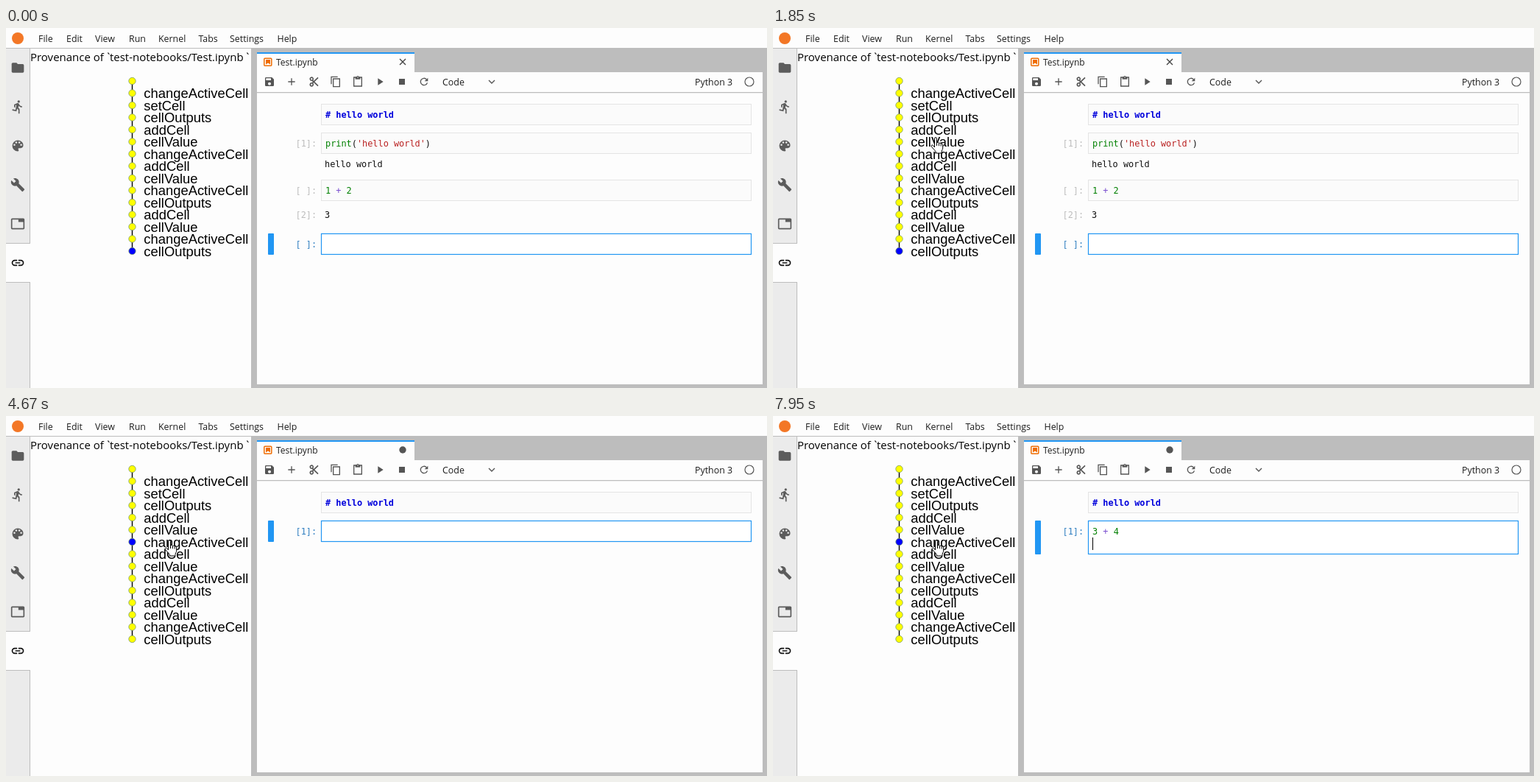
An HTML page that plays this animation: 1034 px wide and 489 px high, repeating every 8 s.

```html
<!DOCTYPE html>
<html lang="en">
<head>
<meta charset="utf-8">
<title>Notebook provenance</title>
<style>
  html, body { margin: 0; width: 100%; height: 100%; overflow: hidden; background: #fdfdfd; }
  svg { display: block; width: 1034px; height: 489px; }
  text { white-space: pre; }
  .ui { font: 12.4px "Open Sans", "Noto Sans", sans-serif; fill: #1c1c1c; }
  .title { font: 15px "Open Sans", "Noto Sans", sans-serif; fill: #000; }
  .tree { font: 18.4px "Liberation Sans", Arial, sans-serif; fill: #000; }
  .code { font: 11.88px "DejaVu Sans Mono", monospace; fill: #111; }
  .head { font-weight: bold; fill: #0000dc; }
  .num, .fn { fill: #008000; }
  .op { fill: #7b4fd0; }
  .str { fill: #ba2121; }
  .idle { fill: #bdbdbd; }
  .live { fill: #307fc1; }
</style>
</head>
<body>
<svg id="stage" viewBox="0 0 1034 489" xmlns="http://www.w3.org/2000/svg"></svg>
<script>
const LOOP = 8000, JUMP = 2690;
const PAPER = '#fdfdfd', GREY = '#bdbdbd', BLUE = '#2196f3', INK = '#555';

// ---- markup helpers ----
const rect = (x, y, w, h, fill, extra = '') =>
  `<rect x="${x}" y="${y}" width="${w}" height="${h}" fill="${fill}" ${extra}/>`;
const text = (x, y, cls, body) => `<text x="${x}" y="${y}" class="${cls}">${body}</text>`;
const span = (cls, body) => `<tspan class="${cls}">${body}</tspan>`;
const circle = (x, y, r, extra) => `<circle cx="${x}" cy="${y}" r="${r}" ${extra}/>`;
const path = (d, extra = '') => `<path d="${d}" ${extra}/>`;
const line = (d, width = 2) => path(d, `fill="none" stroke="currentColor" stroke-width="${width}"`);

// Icons live on a 24 unit grid and are centred on (x, y).
const icon = (body, x, y, size, color) => {
  const k = size / 24;
  return `<g transform="translate(${x - size / 2} ${y - size / 2}) scale(${k})" fill="${color}" color="${color}">${body}</g>`;
};

const ICONS = {
  folder: path('M10 4H4c-1.1 0-2 .9-2 2v12c0 1.1.9 2 2 2h16c1.1 0 2-.9 2-2V8c0-1.1-.9-2-2-2h-8z'),
  run: circle(13.5, 3.5, 2, '') +
    path('M9.9 19.4l1-4.4 2.1 2v6h2v-7.5l-2.1-2 .6-3c1.3 1.5 3.3 2.5 5.5 2.5v-2c-1.9 0-3.5-1-4.3-2.4l-1-1.6c-.4-.6-1-1-1.7-1l-.8.1L6 8.3V13h2V9.6l1.8-.7L8.2 17l-4.9-1-.4 2z'),
  palette: path('M12 3a9 9 0 0 0 0 18c.8 0 1.5-.7 1.5-1.5 0-.9-.8-1.200-.8-2 0-.8.7-1.500 1.500-1.500H16c2.800 0 5-2.200 5-5 0-4.400-4-8-9-8z') +
    [[6.5, 10.5], [9.5, 6.5], [14.5, 6.5], [17.5, 10.5]].map(([x, y]) => circle(x, y, 1.5, 'fill="#ebebeb"')).join(''),
  wrench: path('M22.7 19l-9.1-9.1c.9-2.3.4-5-1.5-6.900-2-2-5-2.400-7.400-1.300L9 6 6 9 1.600 4.700C.4 7.100.9 10.100 2.900 12.100c1.900 1.900 4.600 2.400 6.900 1.500l9.100 9.100c.4.400 1 .400 1.400 0l2.300-2.300c.5-.4.5-1.100.1-1.400z'),
  tabs: path('M21 3H3c-1.1 0-2 .9-2 2v14c0 1.100.9 2 2 2h18c1.100 0 2-.9 2-2V5c0-1.100-.9-2-2-2zm0 16H3V5h10v4h8z'),
  link: line('M11 8H7a4 4 0 0 0 0 8h4M13 8h4a4 4 0 0 1 0 8h-4M8 12h8'),
  save: path('M17 3H5a2 2 0 0 0-2 2v14a2 2 0 0 0 2 2h14a2 2 0 0 0 2-2V7zm-5 16a3 3 0 1 1 0-6 3 3 0 0 1 0 6zm3-10H5V5h10z'),
  add: line('M5 12h14M12 5v14'),
  cut: line('M9 15a3 3 0 1 1-1-0.200M9 9a3 3 0 1 0-1 0.200M8.500 8.500L21 20.500M8.500 15.500L21 3.500', 2.4),
  copy: line('M3 17V2h13M7 6h13v16H7z'),
  paste: line('M4 3h16v18H4z') + rect(7, 2, 10, 5, INK) + circle(12, 2.5, 2.5, '') + circle(12, 3, 1, `fill="${PAPER}"`),
  play: path('M8 5v14l11-7z'),
  stop: path('M6 6h12v12H6z'),
  reload: line('M18.700 14A7 7 0 1 1 17 7') + path('M20 4v7h-7z')
};

const join = (list, fn) => list.map(fn).join('');

// ---- cells ----
const prompt = (y, body, cls = 'idle') => text(393.5, y, 'code ' + cls, body);
const box = (y, body) =>
  rect(428.5, y + .5, 584, 28, '#fbfbfb', 'stroke="#e4e4e4"') + text(434, y + 19, 'code', body);
const activeBox = (y, h) =>
  rect(356, y, 8, h, BLUE, 'rx="1"') + rect(428.5, y + .5, 584, h - 1, '#fff', `stroke="${BLUE}" stroke-width="1.2"`);
const sum = (a, b) => span('num', a) + span('op', ' + ') + span('num', b);

// ---- provenance tree ----
const steps = ('start changeActiveCell setCell cellOutputs addCell cellValue changeActiveCell addCell ' +
  'cellValue changeActiveCell cellOutputs addCell cellValue changeActiveCell cellOutputs').split(' ');
const nodeY = i => 72 + 16.5 * i;

const chrome = () => [
  rect(0, 0, 1034, 489, PAPER),
  rect(0, 27, 1034, 1, GREY),
  circle(16, 14, 8, 'fill="#f37726"'),
  join([[44, 'File'], [82, 'Edit'], [121, 'View'], [167, 'Run'], [207, 'Kernel'],
    [261.5, 'Tabs'], [304, 'Settings'], [368.5, 'Help']], ([x, s]) => text(x, 19, 'ui', s)),

  rect(0, 28, 32, 461, '#ebebeb'),
  rect(32, 28, 1, 461, GREY),
  rect(0, 292, 33, 54, GREY),
  rect(0, 293, 33, 52, PAPER),
  join(['folder', 'run', 'palette', 'wrench', 'tabs'], (n, i) => icon(ICONS[n], 16, 54 + 53 * i, 20, '#5c5c5c')),
  icon(ICONS.link, 16, 319, 20, '#111'),

  `<text y="45" class="title"><tspan x="33">Provenance of</tspan><tspan x="135">\`</tspan>` +
    `<tspan x="141">test-notebooks/Test.ipynb</tspan><tspan x="324">\`</tspan></text>`,
  rect(170.8, 72, 1.4, 231, '#000'),
  join(steps, (s, i) => circle(171.5, nodeY(i), 4.7, `id="n${i}" stroke="#7a9a70" stroke-width=".8"`) +
    (i ? text(187.3, nodeY(i) + 6.5, 'tree', s) : '')),

  rect(333, 27, 701, 462, GREY),
  rect(341, 60, 687, 424, PAPER),
  rect(341, 33, 214, 27, PAPER),
  rect(341, 33, 214, 2, BLUE),
  rect(341, 87, 687, 1, GREY),
  rect(341, 88, 687, 1, '#ececec'),
  rect(350.8, 41.3, 10, 10, PAPER, 'stroke="#ef6c00" stroke-width="1.5" rx="1"'),
  path('M353 43h6v6.500l-3-2-3 2z', 'fill="#ef6c00"'),
  `<text x="367" y="51" class="ui" style="font-size:12px">Test.ipynb</text>`,
  join(['save', 'add', 'cut', 'copy', 'paste', 'play', 'stop', 'reload'],
    (n, i) => icon(ICONS[n], 358 + 30 * i, 73, 16, INK)),
  text(593, 78, 'ui', 'Code'),
  path('M656 71l4 4 4-4', `fill="none" stroke="${INK}" stroke-width="1.4"`),
  text(936, 78, 'ui', 'Python 3'),
  circle(1010, 73, 6, `fill="none" stroke="${INK}" stroke-width="1.2"`),
  box(103, span('head', '# hello world'))
].join('');

const before = () => [
  path('M535 42l8 8m0-8l-8 8', 'stroke="#444" stroke-width="1.4"'),
  prompt(161, '[1]:'),
  box(142, span('fn', 'print') + '(' + span('str', "'hello world'") + ')'),
  text(433, 189, 'code', 'hello world'),
  prompt(225, '[ ]:'),
  box(206, sum(1, 2)),
  prompt(258, '[2]:'),
  text(433, 258, 'code', '3'),
  activeBox(279, 29),
  prompt(298, '[ ]:', 'live')
].join('');

const after = () => [
  circle(539, 46, 4.7, 'fill="#555"'),
  `<g id="small">${activeBox(142, 29)}</g><g id="tall">${activeBox(142, 46)}</g>`,
  prompt(161, '[1]:', 'live'),
  '<text id="typed" x="434" y="161" class="code"></text>',
  rect(434, 148, 1, 17, '#000', 'id="caret"')
].join('');

const pointers = () =>
  '<g id="arrow" fill="#fff" stroke="#000">' +
  path('M.5.7v15.600l3.600-3.400 2.400 5.400 2.500-1.100-2.400-5.300h4.900z') + '</g>' +
  '<g id="hand" fill="#fff" stroke="#000" stroke-linejoin="round">' +
  path('M5.500 14V2.200a1.500 1.500 0 0 1 3 0V8c.5-1 2.600-.8 2.900.5.6-.7 2.400-.5 2.800.8.8-.6 2.500-.2 2.500 1.500V15c0 2-1.700 3.500-1.700 5.500V22H7.500v-1.500C6 18 3 15.500 1.200 12.800c-.6-1.200.8-2.400 2-1.600z') +
  path('M8.500 8v4M11.400 8.700v3.500M14.200 9.500v3', 'fill="none"') + '</g>';

document.getElementById('stage').innerHTML =
  chrome() + `<g id="before">${before()}</g><g id="after">${after()}</g>` + pointers();

// ---- timeline ----
const $ = id => document.getElementById(id);
const show = (id, on) => $(id).setAttribute('display', on ? 'inline' : 'none');
const at = (list, t) => list.filter(k => k[0] <= t).pop();

// [time, x, y]
const moves = [
  [120, 762, 448], [200, 499, 358], [280, 374, 273], [350, 312, 238],
  [430, 250, 185], [500, 226, 156], [560, 214, 141], [640, 211, 134], [720, 210, 131],
  [860, 211, 133], [940, 212, 134], [1550, 212, 135],
  [1710, 213, 138], [1780, 213, 143], [1850, 214, 148],
  [2080, 214, 149], [2160, 214, 154], [2230, 215, 160], [2300, 215, 165], [2380, 215, 167],
  [4670, 215, 168]
];
// [time, typed characters]
const typing = [[JUMP, 0], [6350, 1], [6660, 2], [6810, 3], [7040, 4], [7740, 5], [7950, 6]];
const blinks = [JUMP, 3150, 3690, 4210, 4750, 5210, 5750, 6290, 6350, 7580, 7660];
const word = [['num', '3'], ['', ' '], ['op', '+'], ['', ' '], ['num', '4']];

function draw(t) {
  const jumped = t >= JUMP;
  show('before', !jumped);
  show('after', jumped);
  const current = jumped ? 6 : steps.length - 1;
  steps.forEach((_, i) => $('n' + i).setAttribute('fill', i === current ? '#00f' : '#ff0'));

  const pos = at(moves, t);
  const overText = t >= 430;
  show('arrow', pos && !overText);
  show('hand', pos && overText);
  if (pos) $(overText ? 'hand' : 'arrow').setAttribute('transform', `translate(${pos[1]} ${pos[2]})`);

  if (!jumped) return;
  const n = at(typing, t)[1], newline = n > 5;
  show('small', !newline);
  show('tall', newline);
  $('typed').innerHTML = join(word.slice(0, n), ([c, s]) => span(c, s));
  $('caret').setAttribute('x', newline ? 434 : 434 + Math.round(7.15 * n));
  $('caret').setAttribute('y', newline ? 165 : 148);
  show('caret', blinks.filter(b => b <= t).length % 2);
}

const start = performance.now();
function tick() {
  draw((performance.now() - start) % LOOP);
  requestAnimationFrame(tick);
}
tick();
</script>
</body>
</html>
```
